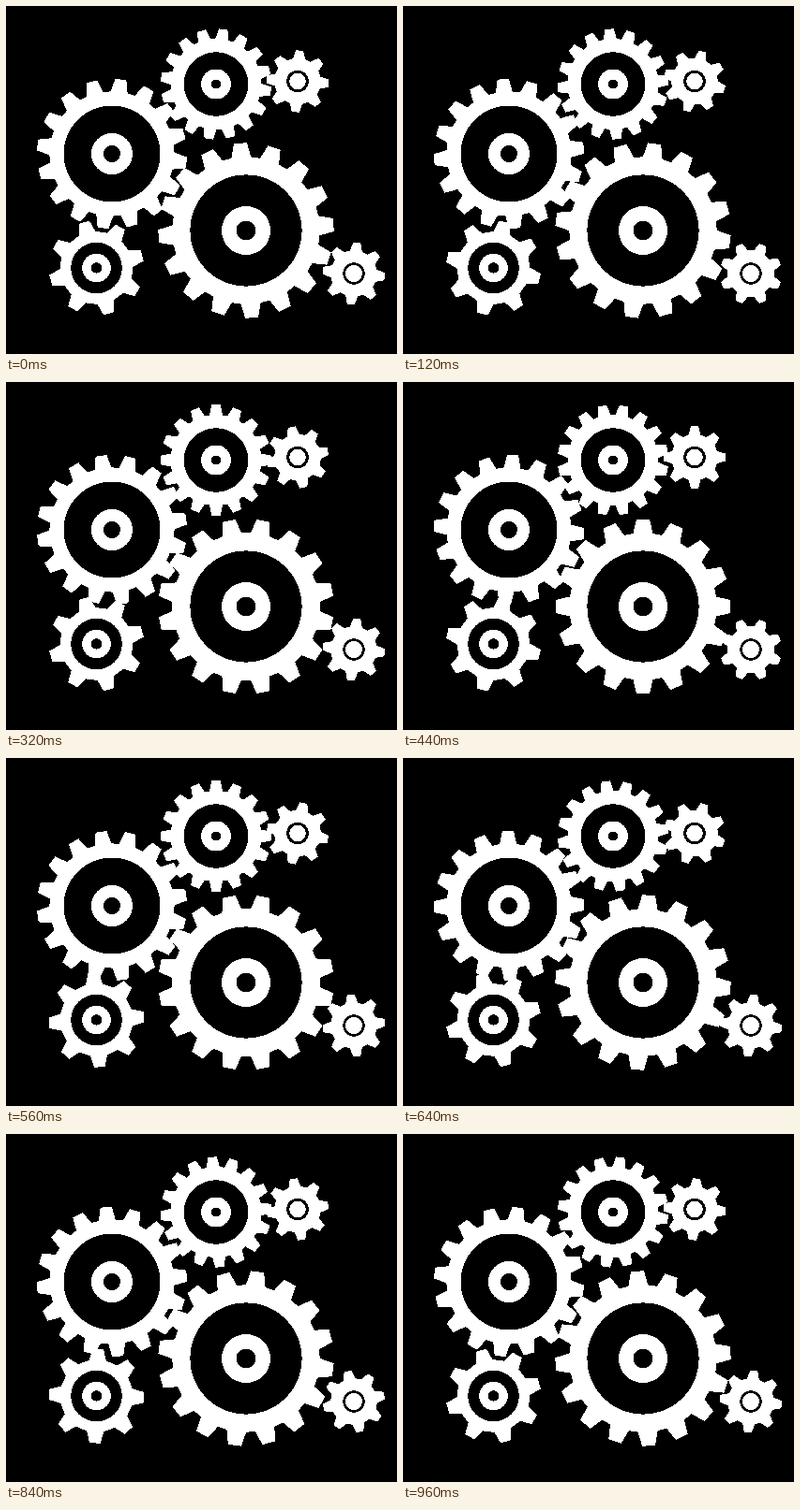
An HTML page for the animation above (1000 ms loop, 417x372 px).

```html
<!DOCTYPE html>
<html lang="en">
<head>
<meta charset="utf-8">
<title>Gears</title>
<style>
html, body { margin: 0; width: 100%; height: 100%; overflow: hidden; background: #000; }
svg { display: block; }
</style>
</head>
<body>
<svg id="stage" width="417" height="372" viewBox="0 0 417 372" shape-rendering="crispEdges"></svg>
<script>
const NS = 'http://www.w3.org/2000/svg';
const stage = document.getElementById('stage');
const STEP = 40, STEPS = 25, CYCLE = 24;

// x, y, teeth, outer and root radius, tip and base width of a tooth,
// rings (alternating black / white), start phase and teeth per cycle
const gears = [
  { x: 113, y: 158, n: 16, R: 80, r: 66, tip: 12, base: 18, rings: [51.5, 22, 9], phase: .3, turn: 4 },
  { x: 224, y: 83.5, n: 16, R: 59, r: 48, tip: 9.5, base: 14, rings: [34.3, 16, 5], phase: 1 / 3, turn: -4 },
  { x: 311, y: 80.5, n: 8, R: 33, r: 24, tip: 8, base: 13, rings: [11.8, 8.8], phase: 1 / 12, turn: 2 },
  { x: 256, y: 240, n: 16, R: 93.5, r: 78, tip: 14, base: 21, rings: [59.6, 26, 10.5], phase: -1 / 6, turn: -4 },
  { x: 96.5, y: 280, n: 8, R: 50.5, r: 38, tip: 11.5, base: 18, rings: [27.3, 15.3, 5.7], phase: 2 / 3, turn: -3 },
  { x: 371, y: 286, n: 8, R: 33, r: 24, tip: 8, base: 13, rings: [11.7, 9], phase: 1 / 8, turn: 3 }
];

function add(parent, tag, attrs) {
  const el = document.createElementNS(NS, tag);
  for (const k in attrs) el.setAttribute(k, attrs[k]);
  return parent.appendChild(el);
}

function outline(g) {
  const pts = [];
  for (let i = 0; i < g.n; i++) {
    const a = i * 2 * Math.PI / g.n, c = Math.cos(a), s = Math.sin(a);
    const put = (u, v) => pts.push((u * c + v * s).toFixed(2) + ',' + (u * s - v * c).toFixed(2));
    put(-g.base / 2, g.r);
    put(-g.tip / 2, g.R);
    put(g.tip / 2, g.R);
    put(g.base / 2, g.r);
  }
  return pts.join(' ');
}

for (const g of gears) {
  const box = add(stage, 'g', { transform: `translate(${g.x} ${g.y})`, fill: '#fff' });
  g.wheel = add(box, 'polygon', { points: outline(g) });
  add(box, 'circle', { r: g.r });
  g.rings.forEach((r, i) => add(box, 'circle', { r, fill: i % 2 ? '#fff' : '#000' }));
}

function draw(now) {
  const step = Math.floor(now / STEP) % STEPS;
  for (const g of gears) {
    const angle = (g.phase + g.turn * step / CYCLE) * 360 / g.n;
    g.wheel.setAttribute('transform', `rotate(${angle.toFixed(3)})`);
  }
}

const start = performance.now();
function tick() {
  draw(performance.now() - start);
  requestAnimationFrame(tick);
}
draw(0);
requestAnimationFrame(tick);
</script>
</body>
</html>
```
